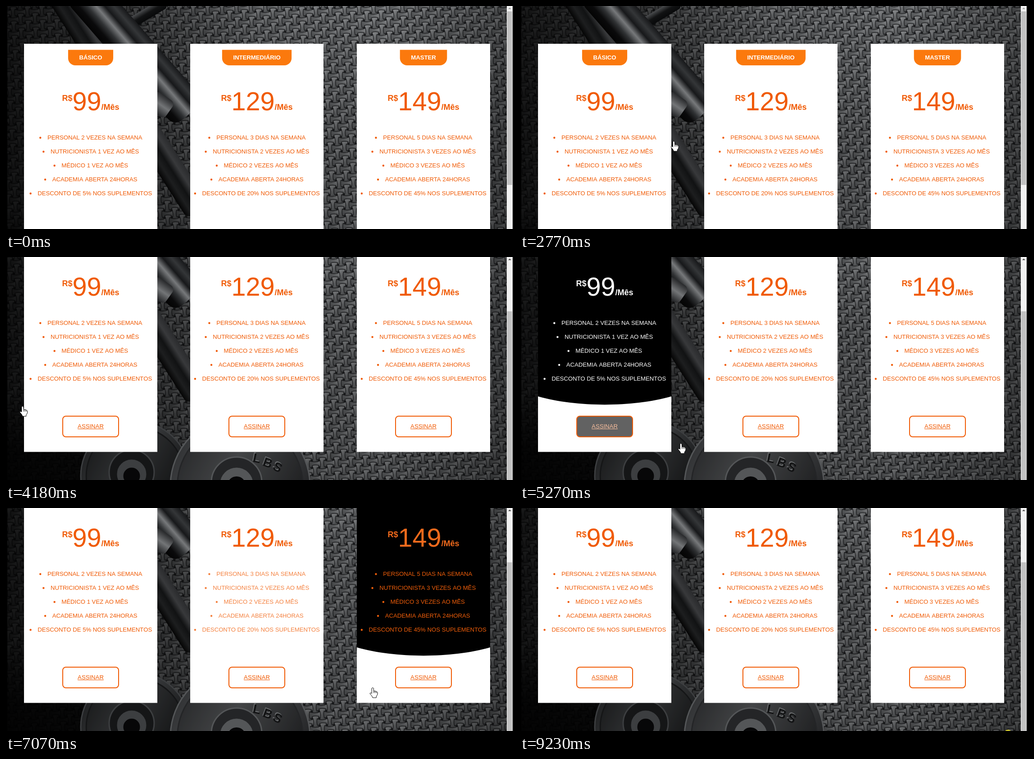
Recreate the animation shown at these times as an HTML page with a canvas. Size 1128 px wide and 496 px high, loop 9.31 s.

```html
<!DOCTYPE html>
<html lang="pt">
<head>
<meta charset="utf-8">
<title>Planos</title>
<style>
html, body { margin: 0; width: 100%; height: 100%; overflow: hidden; background: #000; }
canvas { display: block; }
</style>
</head>
<body>
<canvas id="stage" width="1128" height="496"></canvas>
<script>
const LOOP = 9310, W = 1128, H = 496, PAGE_H = 650;
const FADE = 220, LAG = 40, MAX_SCROLL = 146;
const CARD_W = 296, CARD_TOP = 84, CARD_BOTTOM = 579.5;
const BUTTON = { dx: 85, y: 499, w: 126, h: 48 };
const SIZE = 13.17;
const FONT = '"Liberation Sans", Arial, sans-serif';
const ORANGE = [240, 90, 4], WHITE = [255, 255, 255], BLACK = [0, 0, 0];
const ctx = document.getElementById('stage').getContext('2d');

const times = (n, word) => `${n} ${word}${n > 1 ? 'ES' : ''}`;
const plan = (name, price, personal, visits, discount) => ({
  name, price,
  items: [`PERSONAL ${personal} NA SEMANA`, `NUTRICIONISTA ${visits} AO MÊS`, `MÉDICO ${visits} AO MÊS`,
    'ACADEMIA ABERTA 24HORAS', `DESCONTO DE ${discount}% NOS SUPLEMENTOS`]
});
const vez = n => n > 1 ? `${n} VEZES` : `${n} VEZ`;
const plans = [
  plan('BÁSICO', '99', vez(2), vez(1), 5),
  plan('INTERMEDIÁRIO', '129', '3 DIAS', vez(2), 20),
  plan('MASTER', '149', '5 DIAS', vez(3), 45)
];

// waypoints of the pointer's fingertip: [time, x, y]
const route = [
  [370, 960, 474], [960, 779, 350], [1300, 759, 346], [1630, 708, 336], [2480, 409, 315],
  [2770, 342, 301], [3240, 46, 325], [3710, 33, 330], [4150, 33, 330], [4700, 100, 370],
  [5140, 252, 391], [5270, 357, 415], [5500, 410, 419], [6000, 515, 396], [6880, 705, 396],
  [7070, 814, 400], [8000, 990, 392], [8900, 1077, 498]
];

const clamp = v => Math.min(1, Math.max(0, v));
const ease = v => { v = clamp(v); return v * v * (3 - 2 * v); };
const lerp = (a, b, k) => a + (b - a) * k;
const mix = (a, b, k) => `rgb(${a.map((v, i) => Math.round(lerp(v, b[i], k))).join()})`;
const scrollAt = t => Math.round(MAX_SCROLL * ease((t - 3590) / 510));

function pointerAt(t) {
  const i = route.findIndex(p => p[0] > t);
  if (i < 1) return null;
  const [t0, x0, y0] = route[i - 1], [t1, x1, y1] = route[i];
  const k = (t - t0) / (t1 - t0);
  return { x: lerp(x0, x1, k), y: lerp(y0, y1, k) };
}

// time spans in which the pointer is over a box of the page
function hoverSpans(x, y, w, h) {
  const spans = [];
  let open = false;
  for (let t = 0; t < LOOP; t += 2) {
    const p = pointerAt(t);
    const over = !!p && p.x >= x && p.x < x + w && p.y + scrollAt(t) >= y && p.y + scrollAt(t) < y + h;
    if (over && !open) spans.push([t + LAG, LOOP]);
    if (!over && open) spans[spans.length - 1][1] = t + LAG;
    open = over;
  }
  return spans;
}
const inside = (spans, t) => spans.some(([a, b]) => t >= a && t < b);
const fade = (spans, t, length = FADE) => Math.max(0, ...spans.map(([a, b]) =>
  Math.min(ease((t - a) / length), 1 - ease((t - b) / length))));

plans.forEach((p, i) => {
  p.x = Math.floor(40 + i * 369.5);
  p.hover = hoverSpans(p.x, CARD_TOP, CARD_W, CARD_BOTTOM - CARD_TOP);
  p.press = hoverSpans(p.x + BUTTON.dx, BUTTON.y, BUTTON.w, BUTTON.h);
});

function text(str, x, y, size, color, weight = '', align = 'left') {
  ctx.font = `${weight} ${size}px ${FONT}`;
  ctx.textAlign = align;
  ctx.fillStyle = color;
  ctx.fillText(str, x, y);
  return ctx.measureText(str).width;
}

// ---- backdrop: rubber mat with dumbbells ----
function makeBackdrop() {
  const cv = document.createElement('canvas');
  cv.width = W;
  cv.height = PAGE_H;
  const g = cv.getContext('2d');

  const ramp = (x0, y0, x1, y1, ...colors) => {
    const r = g.createLinearGradient(x0, y0, x1, y1);
    colors.forEach((c, i) => r.addColorStop(i / (colors.length - 1), c));
    return r;
  };
  const wash = fill => { g.fillStyle = fill; g.fillRect(0, 0, W, PAGE_H); };
  const shade = (...alphas) => alphas.map(a => `rgba(0,0,0,${a})`);

  // a long plate seen edge-on, shaded across its width
  const band = (x, y, degrees, length, width, ...colors) => {
    g.save();
    g.translate(x, y);
    g.rotate(degrees * Math.PI / 180);
    g.fillStyle = ramp(0, -width / 2, 0, width / 2, ...colors);
    g.beginPath();
    g.roundRect(0, -width / 2, length, width, width / 4);
    g.fill();
    g.restore();
  };
  const disc = (x, y, r, fill, edge) => {
    g.beginPath();
    g.arc(x, y, r, 0, 7);
    g.fillStyle = fill;
    g.fill();
    g.strokeStyle = edge;
    g.lineWidth = 3;
    g.stroke();
  };
  const plate = (x, y, r, hub, light, dark) => {
    disc(x, y, r, ramp(x - r, y - r, x + r, y, dark, light, dark), light);
    disc(x, y, r * 0.9, 'rgba(0,0,0,.2)', dark);
    disc(x - 8, y - 8, hub, dark, light);
    disc(x - 8, y - 4, hub * 0.68, light, dark);
    disc(x - 8, y, hub * 0.4, '#070708', light);
  };

  wash('#1d1e20');
  const pitch = 16, n = pitch * 0.8, w = pitch * 0.47, waist = pitch * 0.12;
  g.save();
  g.rotate(-0.05);
  g.lineWidth = 1.5;
  g.strokeStyle = '#232426';
  g.fillStyle = ramp(-w, -n, w, n, '#919395', '#66686a', '#525456');
  for (let j = -1; j < 46; j++) for (let i = -3; i < 74; i++) {
    g.save();
    g.translate(i * pitch, j * pitch);
    if ((i + j) & 1) g.rotate(Math.PI / 2);
    g.beginPath();
    for (const s of [1, -1]) {
      g.lineTo(-w * s, -n * s);
      g.quadraticCurveTo(0, -n * 1.15 * s, w * s, -n * s);
      g.quadraticCurveTo(waist * s, 0, w * s, n * s);
    }
    g.closePath();
    g.fill();
    g.stroke();
    g.restore();
  }
  g.restore();
  wash(ramp(0, 0, W, 0, ...shade(0.8, 0.5, 0.1, 0, 0.32)));
  wash(ramp(0, 0, 0, PAGE_H, ...shade(0, 0.18, 0.22)));

  // leaning dumbbell: far bar, two plates, handle
  band(258, 50, -31, 110, 24, '#4a4c4e', '#111213', '#08090a');
  band(110, -40, 57.5, 590, 58, '#2a2b2d', '#38393b', '#111213', '#1d1e1f', '#050505');
  band(165, -40, 49, 370, 88, '#17181a', '#343638', '#17181a', '#77797b', '#303234', '#0a0a0b', '#040404');
  band(322, 205, 35, 50, 44, '#28292b', '#737577', '#242527');

  // plates on the floor
  band(0, 580, 0, 230, 300, ...shade(0, 0.75, 0.85));
  plate(287, 633, 121, 50, '#3c3e40', '#151617');
  plate(520, 655, 155, 56, '#545658', '#242527');
  g.font = `bold 28px ${FONT}`;
  [...'LBS'].forEach((c, i) => {
    g.save();
    g.translate(546 + i * 22, 600 + i * 8);
    g.rotate(0.2 + i * 0.15);
    ['#6a6c6e', '#121314'].forEach((color, k) => {
      g.fillStyle = color;
      g.fillText(c, k * 2 - 1, k * 2 - 1);
    });
    g.restore();
  });
  return cv;
}
const backdrop = makeBackdrop();

// ---- page parts, in page coordinates ----
function drawPanel(x) {
  ctx.fillStyle = '#000';
  ctx.beginPath();
  ctx.moveTo(x, CARD_TOP);
  ctx.lineTo(x, 456);
  ctx.bezierCurveTo(x + 85, 480.5, x + CARD_W - 85, 480.5, x + CARD_W, 456);
  ctx.lineTo(x + CARD_W, CARD_TOP);
  ctx.fill();
}

function drawButton(x, cx, press) {
  ctx.beginPath();
  ctx.roundRect(x + BUTTON.dx + 1, BUTTON.y + 1, BUTTON.w - 2, BUTTON.h - 2, 7);
  ctx.fillStyle = mix(WHITE, BLACK, press);
  ctx.fill();
  ctx.strokeStyle = `rgb(${ORANGE})`;
  ctx.lineWidth = 2;
  ctx.stroke();
  const width = text('ASSINAR', cx, 527, SIZE, mix(ORANGE, WHITE, press), '', 'center');
  ctx.fillRect(cx - width / 2, 528, width, 1);
}

function drawCard({ x, name, price, items, hover, press }, t) {
  const cx = x + CARD_W / 2;

  ctx.fillStyle = '#fff';
  ctx.fillRect(x, CARD_TOP, CARD_W, CARD_BOTTOM - CARD_TOP);
  if (inside(hover, t)) drawPanel(x);

  ctx.font = `bold ${SIZE}px ${FONT}`;
  const tab = ctx.measureText(name).width + 49;
  ctx.fillStyle = '#fb790d';
  ctx.beginPath();
  ctx.roundRect(cx - tab / 2, 97.5, tab, 34.5, [0, 0, 16, 16]);
  ctx.fill();
  text(name, cx, 119, SIZE, '#fff', 'bold', 'center');

  const priceInk = mix(ORANGE, WHITE, fade(hover, t, FADE / 2));
  ctx.font = `57.6px ${FONT}`;
  let px = cx - (ctx.measureText(price).width + 63) / 2;
  px += text('R$', px, 211, 18, priceInk, 'bold');
  px += text(price, px, 232, 57.6, priceInk);
  text('/Mês', px, 231, 18, priceInk, 'bold');

  const itemInk = mix(ORANGE, WHITE, fade(hover, t));
  items.forEach((item, i) => {
    const y = Math.round(296.6 + i * 31.15);
    const width = text(item, cx + 9.2, y, SIZE, itemInk, '', 'center');
    ctx.beginPath();
    ctx.arc(cx - width / 2 - 6.5, y - 4, 2.2, 0, 7);
    ctx.fill();
  });

  drawButton(x, cx, fade(press, t));
}

function drawScrollbar(scroll) {
  ctx.fillStyle = '#f1f1f1';
  ctx.fillRect(1112, 0, 13, H);
  ctx.fillStyle = '#c1c1c1';
  ctx.fillRect(1113, 12 + scroll * 0.745, 11, 386);
  ctx.fillStyle = scroll ? '#505050' : '#a3a3a3';
  ctx.beginPath();
  ctx.moveTo(1115, 7);
  ctx.lineTo(1118.5, 3.5);
  ctx.lineTo(1122, 7);
  ctx.fill();
}

function drawPointer({ x, y }) {
  ctx.save();
  ctx.translate(x, y);
  ctx.beginPath();
  ctx.moveTo(-2, 1);
  ctx.quadraticCurveTo(0, -2, 2, 1);
  ctx.lineTo(2.5, 7);
  ctx.quadraticCurveTo(11, 7, 11, 12);
  ctx.quadraticCurveTo(11, 16, 8, 19);
  ctx.lineTo(8, 22);
  ctx.lineTo(0, 22);
  ctx.quadraticCurveTo(-1, 18, -6, 13);
  ctx.quadraticCurveTo(-6, 9.5, -2, 12.5);
  ctx.closePath();
  ctx.fillStyle = '#fff';
  ctx.fill();
  for (let i = 0; i < 3; i++) {
    ctx.moveTo(2.5 + i * 3, 7 + i);
    ctx.lineTo(2.5 + i * 3, 11.5);
  }
  ctx.strokeStyle = '#000';
  ctx.lineWidth = 1;
  ctx.lineJoin = 'round';
  ctx.stroke();
  ctx.restore();
}

function draw(t) {
  const scroll = scrollAt(t), pointer = pointerAt(t);
  ctx.save();
  ctx.translate(0, -scroll);
  ctx.drawImage(backdrop, 0, 0);
  plans.forEach(p => drawCard(p, t));
  ctx.restore();

  drawScrollbar(scroll);
  ctx.fillStyle = '#000';
  ctx.fillRect(0, 0, 3, H);
  ctx.fillRect(1125, 0, 3, H);

  if (pointer) drawPointer(pointer);
  if (t >= 9230) {
    ctx.fillStyle = '#c9c22a';
    ctx.beginPath();
    ctx.arc(1083.5, 501, 8, 0, 7);
    ctx.fill();
  }
}

const start = performance.now();
function tick() {
  draw((performance.now() - start) % LOOP);
  requestAnimationFrame(tick);
}
tick();
</script>
</body>
</html>
```
